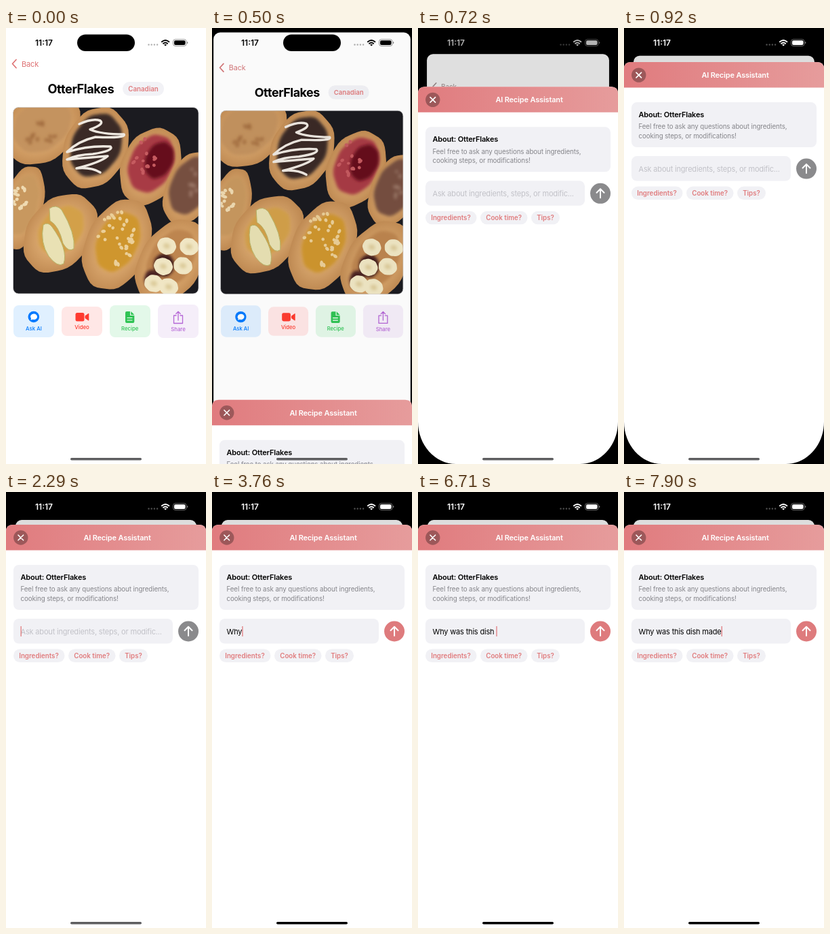
An HTML page for the animation above (8000 ms loop, 295 by 640 pixels).

```html
<!DOCTYPE html>
<html lang="en">
<head>
<meta charset="utf-8">
<title>Recipe assistant</title>
<style>
  html, body { margin: 0; height: 100%; overflow: hidden; background: #000; }
  svg { display: block; width: 100vw; height: 100vh; font: 400 11px Inter, sans-serif; }
  .title { font-weight: 700; font-size: 18.2px; letter-spacing: -.026em; }
  .body { letter-spacing: -.016em; }
  .head { font-weight: 600; letter-spacing: -.016em; }
  .note { font-size: 9.75px; letter-spacing: -.0095em; fill: #85858a; }
  .chip { font-weight: 600; font-size: 9.75px; fill: #e07c7e; text-anchor: middle; }
  .label { font-weight: 500; font-size: 7.8px; text-anchor: middle; }
  .line { fill: none; stroke-linecap: round; stroke-linejoin: round; }
</style>
</head>
<body>
<svg viewBox="0 0 295 640">
  <defs>
    <linearGradient id="pink"><stop stop-color="#e07b7e"/><stop offset="1" stop-color="#e69c9c"/></linearGradient>
    <radialGradient id="crust"><stop offset=".5" stop-color="#dcaa70"/><stop offset="1" stop-color="#c38d55"/></radialGradient>
    <filter id="soft"><feGaussianBlur stdDeviation="2"/></filter>
    <clipPath id="frame"><rect x="10.5" y="116.5" width="273.5" height="273.5" rx="8"/></clipPath>
  </defs>
  <rect width="295" height="640"/>

  <g id="page">
    <rect id="paper" width="295" height="640" fill="#fff"/>
    <g id="back">
      <path class="line" d="M15 46.5L9.5 52.5L15 58.5" stroke="currentColor" stroke-width="1.7"/>
      <text class="body" x="23" y="56.5" fill="currentColor">Back</text>
    </g>
    <text class="title" x="61.5" y="96">OtterFlakes</text>
    <rect x="172" y="79" width="61" height="20.500" rx="10" fill="#f2f2f6"/>
    <text class="chip" x="202.500" y="92.700">Canadian</text>
    <g id="photo" clip-path="url(#frame)"></g>
    <rect x="10.500" y="116.500" width="273.500" height="273.500" rx="8" fill="none" stroke="#ddd" stroke-width=".7"/>

    <rect x="11" y="407" width="60" height="47" rx="8" fill="#e0f0ff"/>
    <circle cx="40.800" cy="424" r="8.300" fill="#007aff"/>
    <path d="M40.800 419.500a5 4.300 0 1 1-1.500 8.300l-2.800 1 .6-2.300a5 4.300 0 0 1 3.700-7z" fill="#fff"/>
    <text class="label" x="41" y="443.700" fill="#007aff">Ask AI</text>

    <rect x="82" y="409" width="60" height="43" rx="8" fill="#ffe7e6"/>
    <rect x="102.500" y="418" width="13" height="12.500" rx="2.500" fill="#ff3b30"/>
    <path d="M116.500 422.500l5-3.500q.8-.3.8.6v9.200q0 .9-.8.600l-5-3.500z" fill="#ff3b30"/>
    <text class="label" x="112" y="442" fill="#ff3b30">Video</text>

    <rect x="153" y="407" width="60" height="47" rx="8" fill="#e3f8e9"/>
    <path d="M178 416h5v6h6.300v9q0 2-2 2h-9.300q-2 0-2-2v-13q0-2 2-2zM184.300 416l5 5h-5z" fill="#30c455"/>
    <path class="line" d="M179 425.500h7M179 429h7" stroke="#fff" stroke-width="1.200"/>
    <text class="label" x="182.700" y="443.700" fill="#30c455">Recipe</text>

    <rect x="224" y="406" width="60" height="49" rx="8" fill="#f5eef9"/>
    <path class="line" d="M251 422h-3.500v11.500h13V422H257M254 429v-12.500M250.800 419.500l3.200-3.200 3.200 3.200" stroke="#b566d6" stroke-width="1.300"/>
    <text class="label" x="254" y="445.200" fill="#b566d6">Share</text>
    <rect id="dim" width="295" height="640" rx="10"/>
  </g>

  <rect x="105" y="9.500" width="85" height="24.500" rx="12.250"/>
  <g id="status">
    <text x="56" y="26" font-size="12" font-weight="600" text-anchor="middle">11:17</text>
    <g opacity=".3">
      <circle cx="210.500" cy="24.500" r="1.200"/><circle cx="214.700" cy="24.500" r="1.200"/>
      <circle cx="218.900" cy="24.500" r="1.200"/><circle cx="223.100" cy="24.500" r="1.200"/>
    </g>
    <path class="line" d="M229.800 20.200q5.300-4.600 10.600 0M232 22.700q3.100-2.600 6.200 0" stroke="currentColor" stroke-width="1.900"/>
    <path d="M235.100 26.500l-2-2.100q2-1.500 4 0z"/>
    <rect x="246.500" y="16.700" width="19.500" height="9.800" rx="3.200" fill="none" stroke="currentColor" opacity=".4"/>
    <rect x="248" y="18.200" width="16.500" height="6.800" rx="2"/>
    <path d="M267 20v3.200q1.300-.4 1.300-1.600t-1.300-1.600z" opacity=".5"/>
  </g>

  <g id="sheet">
    <path d="M0 640V10Q0 0 10 0H285Q295 0 295 10V640z" fill="#fff"/>
    <path d="M0 37.500V10Q0 0 10 0H285Q295 0 295 10V37.500z" fill="url(#pink)"/>
    <circle cx="21.800" cy="19" r="10.700" fill="#000" opacity=".3"/>
    <path class="line" d="M18 15.200l7.600 7.600M25.600 15.200l-7.600 7.600" stroke="#fff" stroke-width="1.600"/>
    <text class="head" x="164" y="23" fill="#fff" text-anchor="middle">AI Recipe Assistant</text>

    <rect x="11" y="59" width="273" height="66" rx="8" fill="#f1f1f5"/>
    <text class="head" x="21.500" y="81">About: OtterFlakes</text>
    <text class="note" x="21.500" y="98.300">Feel free to ask any questions about ingredients,</text>
    <text class="note" x="21.500" y="111.800">cooking steps, or modifications!</text>

    <rect x="11" y="138" width="235" height="36.500" rx="8" fill="#f1f1f5"/>
    <text id="hint" class="body" x="21.500" y="160.500" fill="#c2c2c8">Ask about ingredients, steps, or modific...</text>
    <text id="typed" class="body" x="21.500" y="160.500"></text>
    <rect id="caret" y="149" width="1.300" height="15" fill="#e07c7e"/>
    <circle id="send" cx="269" cy="156.500" r="15"/>
    <path class="line" d="M269 163v-13M263.500 155.300l5.500-5.500 5.500 5.500" stroke="#fff" stroke-width="2"/>

    <g fill="#f1f1f5">
      <rect x="11" y="182.500" width="75.500" height="19.500" rx="9.750"/>
      <rect x="92" y="182.500" width="69.500" height="19.500" rx="9.750"/>
      <rect x="167" y="182.500" width="42" height="19.500" rx="9.750"/>
    </g>
    <text class="chip" x="48.500" y="195.800">Ingredients?</text>
    <text class="chip" x="126.700" y="195.800">Cook time?</text>
    <text class="chip" x="188" y="195.800">Tips?</text>
  </g>
  <path id="corners" d="M0 578C0 612 25 640 56 640H0zM295 578C295 612 270 640 239 640H295z"/>
  <rect id="home" x="95" y="631" width="105" height="3.500" rx="1.750"/>
</svg>

<script>
const $ = id => document.getElementById(id);
const set = (id, attrs) => { for (const k in attrs) $(id).setAttribute(k, attrs[k]); };

// --- Photo: simple pastries on a dark tray ---
let seed = 7;
const random = () => (seed = seed * 16807 % 2147483647) / 2147483647;

function blob(x, y, rx, ry, turn, fill) {
  const phase = random() * 6;
  let d = '';
  for (let i = 0; i < 48; i++) {
    const a = i * Math.PI / 24;
    const r = 1 + .01 * Math.sin(3 * a + phase) + .015 * Math.sin(8 * a + phase);
    d += `${i ? 'L' : 'M'}${(rx * r * Math.cos(a)).toFixed(1)} ${(ry * r * Math.sin(a)).toFixed(1)}`;
  }
  return `<path d="${d}z" fill="${fill}" transform="translate(${x} ${y}) rotate(${turn})"/>`;
}
const soft = shape => `<g filter="url(#soft)">${shape}</g>`;
const pastry = (x, y, rx, ry, turn, topping, size = .72) =>
  blob(x, y, rx, ry, turn, 'url(#crust)') + soft(blob(x + 1, y - 4, rx * size, ry * size, turn, topping));

function crumbs(x, y, spreadX, spreadY, count, color) {
  let out = '';
  while (count--) {
    const a = random() * 7, r = Math.sqrt(random());
    out += blob(x + spreadX * r * Math.cos(a), y + spreadY * r * Math.sin(a), 2 + random() * 2, 2.4, a * 50, color);
  }
  return out;
}
const bananas = [[237, 320], [270, 321], [232, 350], [261, 349], [218, 375], [240, 380]];

$('photo').innerHTML = '<rect x="10" y="116" width="275" height="275" fill="#1b1b20"/>' +
  pastry(52, 147, 48, 62, 55, '#c4935f', .75) + soft(crumbs(52, 155, 28, 20, 12, '#a06a3c')) +
  pastry(132, 176, 46, 62, 25, '#3b2a28', .78) +
  '<path class="line" d="M108 141Q128 132 139 136Q146 141 124 149Q140 156 174 156Q178 162 132 160Q106 166 90 182Q122 172 154 174Q160 180 128 185Q104 186 90 193Q124 190 150 188Q140 197 104 206Q126 204 139 212" stroke="#eee8e0" stroke-width="3.500"/>' +
  pastry(213, 203, 42, 59, 25, '#a83a44', .75) + soft(blob(226, 194, 20, 28, 25, '#66101d')) + crumbs(203, 188, 18, 26, 14, '#c65b60') +
  pastry(271, 235, 35, 56, 25, '#76503f', .8) + soft(crumbs(273, 230, 12, 24, 8, '#9a7666')) +
  pastry(24, 264, 30, 63, 15, '#c8985f') + crumbs(21, 250, 11, 18, 14, '#efdab1') +
  pastry(80, 301, 47, 64, 40, '#d3a049', .62) +
  '<path d="M55 289Q62 284 68 292Q92 325 85 346Q76 352 63 335Q50 315 55 289zM64 265Q74 258 82 267Q103 302 100 324Q92 330 84 316Q78 290 65 283z" fill="#e9e1b4" stroke="#b7b468"/>' +
  pastry(164, 318, 46, 70, 25, '#cf962f', .65) + crumbs(163, 308, 27, 40, 34, '#ebcf98') +
  pastry(243, 343, 45, 67, 32, '#bd854f', .7) + soft(blob(233, 348, 15, 17, 0, '#3f1d1c') + blob(215, 369, 11, 14, 0, '#4a2421')) +
  bananas.map(([x, y]) => blob(x, y, 14, 12.5, 20, '#f0e6c4') + soft(blob(x, y, 5, 4, 20, '#dccb9a'))).join('');

// --- Timeline ---
const LOOP = 8000;
const message = 'Why was this dish made';
const sheetSteps = [500, 610, 720, 820, 920, 2290];
// [time, number of characters shown]
const keystrokes = [
  [3310, 1], [3490, 2], [3610, 3], [4080, 5], [4300, 6], [4420, 7], [4640, 8], [4780, 9],
  [4900, 10], [5310, 12], [5550, 13], [6010, 14], [6150, 15], [6260, 16], [6400, 17],
  [6710, 18], [6850, 19], [7210, 21], [7380, 22]
];

// Critically damped spring, held between display steps
function sheetProgress(t) {
  const held = sheetSteps.filter(s => s <= t).pop();
  if (!held) return 0;
  const x = (held - 458) * .0169;
  return 1 - (1 + x) * Math.exp(-x);
}

function draw(t) {
  const p = sheetProgress(t);
  const scale = 1 - .095 * p;
  set('page', { transform: `translate(${147.5 * (1 - scale)} ${41 * p}) scale(${scale})` });
  set('paper', { rx: p ? 10 : 0 });
  set('back', { color: `rgb(${222 - 65 * p},${114 + 32 * p},${116 + 30 * p})` });
  set('dim', { opacity: .135 * p });
  set('sheet', { transform: `translate(0 ${640 - 592 * p})`, visibility: p ? 'visible' : 'hidden' });
  set('corners', { visibility: t >= 720 && t < 2290 ? 'visible' : 'hidden' });
  set('home', { fill: t < 2400 ? '#5e5e60' : '#000' });

  const light = t < 610 ? 0 : t < 720 ? 70 : t < 820 ? 180 : 255;
  const ink = `rgb(${light},${light},${light})`;
  set('status', { fill: ink, color: ink });

  const count = (keystrokes.filter(k => k[0] <= t).pop() || [0, 0])[1];
  $('typed').textContent = message.slice(0, count).replaceAll(' ', '\u00a0');
  set('hint', { visibility: count ? 'hidden' : 'inherit' });
  set('send', { fill: t < 3490 ? '#8a8a8c' : t < 3610 ? '#b88283' : '#de7b7d' });

  const width = count ? $('typed').getComputedTextLength() : 0;
  const faded = t < 2290 || t >= 3140 && t < 3310;
  const fading = t >= 2910 && t < 3140;
  set('caret', { x: 21.5 + width, opacity: faded ? 0 : fading ? (t < 3030 ? .6 : .25) : 1 });
}

function tick() {
  draw(performance.now() % LOOP);
  requestAnimationFrame(tick);
}
tick();
</script>
</body>
</html>
```
